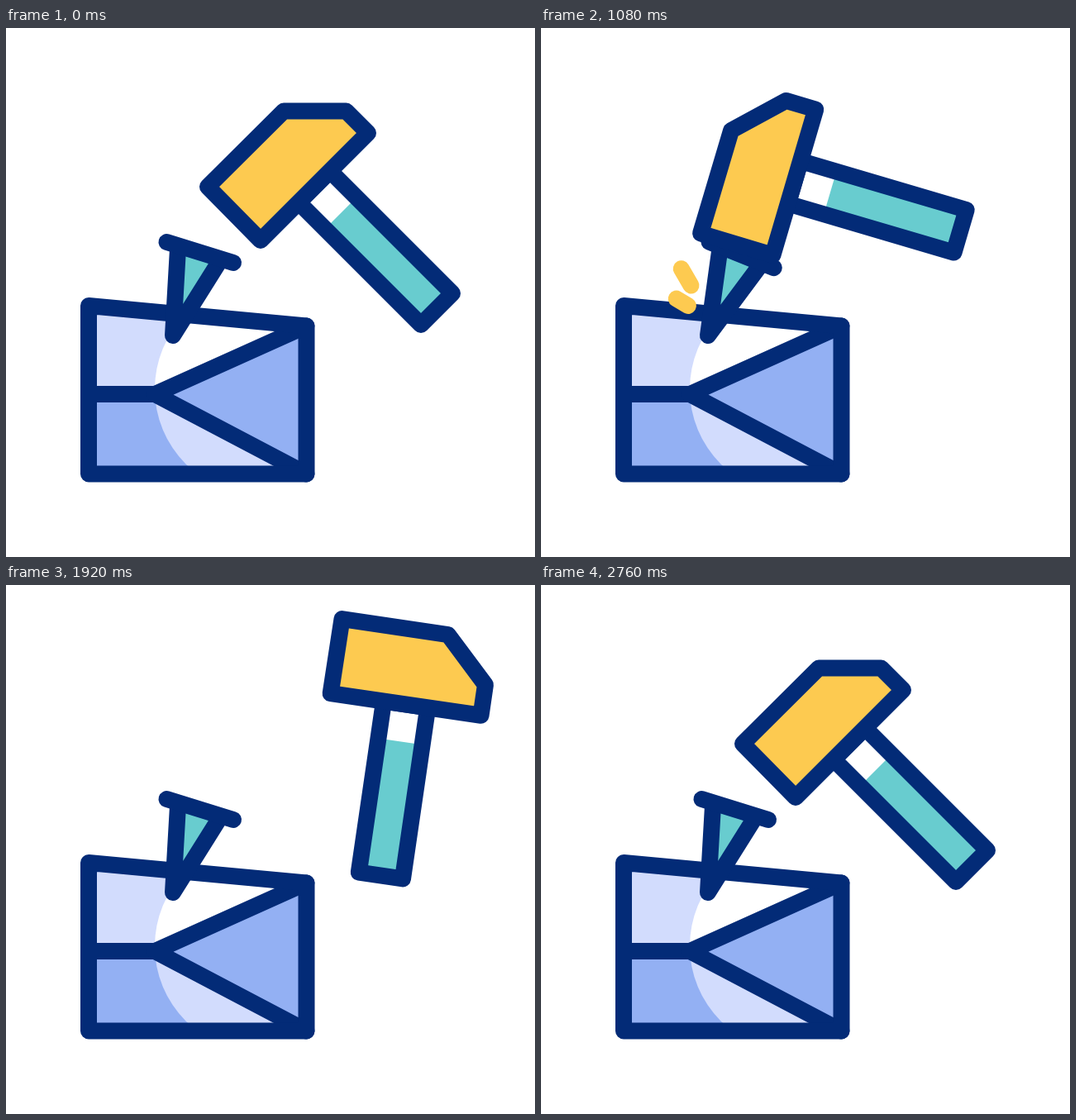
Animation of 640x640 px, one loop 3 s. Source, as an HTML page with a canvas:

```html
<!DOCTYPE html>
<html lang="en">
<head>
<meta charset="utf-8">
<title>Hammer and nail</title>
<style>
  html, body { margin: 0; width: 100%; height: 100%; overflow: hidden; background: #fff; }
  canvas { display: block; width: 640px; height: 640px; }
</style>
</head>
<body>
<canvas id="stage" width="640" height="640"></canvas>
<script>
const ctx = document.getElementById('stage').getContext('2d');
const LOOP = 3000, STEP = 40;
const NAVY = '#032b77', YELLOW = '#fdca50', TEAL = '#68cccf';
const PALE = '#d2dcfd', BLUE = '#93b0f3', WHITE = '#fff';

const clamp = u => Math.min(1, Math.max(0, u));
const mix = (a, b, u) => a + (b - a) * u;
const progress = (t, from, to) => clamp((t - from) / (to - from));
const easeIn = u => u ** 3;
const easeOut = u => 1 - (1 - u) ** 3;

// Hammer poses: pivot position and rotation in degrees.
const PIVOT = [495, 260];
const REST = { x: 495, y: 260, angle: 0 };
const RAISED = { x: 510, y: 296.5, angle: 65 };
const STRUCK = { x: 446, y: 188, angle: -28.6 };
const MOVES = [
  { start: 200, end: 600, from: REST, to: RAISED, ease: easeOut },
  { start: 600, end: 1000, from: RAISED, to: STRUCK, ease: easeIn },
  { start: 1320, end: 1720, from: STRUCK, to: RAISED, ease: easeOut },
  { start: 1720, end: 2120, from: RAISED, to: STRUCK, ease: easeIn },
  { start: 2440, end: 2760, from: STRUCK, to: REST, ease: easeOut }
];
const HITS = [1000, 2120];
const HIT_TIME = 320;

function tracePath(points, closed) {
  ctx.beginPath();
  points.forEach(([x, y]) => ctx.lineTo(x, y));
  if (closed) ctx.closePath();
}

function fillShape(points, color) {
  tracePath(points, true);
  ctx.fillStyle = color;
  ctx.fill();
}

function strokeLine(points, color = NAVY, closed = false) {
  tracePath(points, closed);
  ctx.strokeStyle = color;
  ctx.stroke();
}

function withRotation(x, y, degrees, pivot, draw) {
  ctx.save();
  ctx.translate(x, y);
  ctx.rotate(degrees * Math.PI / 180);
  ctx.translate(-pivot[0], -pivot[1]);
  draw();
  ctx.restore();
}

// A panel whose tone changes inside the round highlight.
function litPanel(points, shade, light) {
  fillShape(points, shade);
  ctx.save();
  tracePath(points, true);
  ctx.clip();
  ctx.beginPath();
  ctx.arc(308, 437, 128, 0, Math.PI * 2);
  ctx.fillStyle = light;
  ctx.fill();
  ctx.restore();
}

function drawBlock() {
  const topLeft = [100, 336], topRight = [363.5, 360.5];
  const bottomRight = [363.5, 539.5], bottomLeft = [100, 539.5];
  const left = [100, 443], fork = [180, 443];
  litPanel([topLeft, topRight, fork, left], PALE, WHITE);
  litPanel([left, fork, bottomRight, bottomLeft], BLUE, PALE);
  fillShape([fork, topRight, bottomRight], BLUE);
  strokeLine([left, fork]);
  strokeLine([topRight, fork, bottomRight]);
  strokeLine([topLeft, topRight, bottomRight, bottomLeft], NAVY, true);
}

function drawNail() {
  const spike = [[208, 267], [202, 372], [256, 286]];
  fillShape(spike, TEAL);
  strokeLine(spike);
  strokeLine([[194.5, 259], [275, 284]]);
}

function drawHammer() {
  fillShape([[354, 211], [502, 359], [540, 321], [392, 173]], WHITE);
  fillShape([[386, 243], [502, 359], [540, 321], [424, 205]], TEAL);
  strokeLine([[354, 211], [502, 359], [540, 321], [392, 173]], NAVY, true);
  const head = [[336, 100.5], [411.5, 100.5], [438, 127], [308, 257], [244, 192]];
  fillShape(head, YELLOW);
  strokeLine(head, NAVY, true);
}

function drawSpark([x0, y0], [x1, y1], from, to) {
  strokeLine([
    [mix(x0, x1, from), mix(y0, y1, from)],
    [mix(x0, x1, to), mix(y0, y1, to)]
  ], YELLOW);
}

function hammerPose(t) {
  const move = MOVES.filter(m => t >= m.start).pop();
  if (!move) return REST;
  const { from, to } = move;
  const u = move.ease(progress(t, move.start, move.end));
  return {
    x: mix(from.x, to.x, u),
    y: mix(from.y, to.y, u),
    angle: mix(from.angle, to.angle, u)
  };
}

function drawScene(t) {
  const hit = HITS.find(h => t > h - STEP && t < h + HIT_TIME);
  const since = hit === undefined ? -STEP : t - hit;
  const tilt = 6.1 * (since < 0 ? 1 + since / STEP : 1 - since / HIT_TIME);

  ctx.fillStyle = WHITE;
  ctx.fillRect(0, 0, 640, 640);
  ctx.lineWidth = 20;
  ctx.lineCap = ctx.lineJoin = 'round';

  drawBlock();
  withRotation(202, 372, tilt, [202, 372], drawNail);
  if (since > 0) {
    const tail = progress(since, 160, HIT_TIME);
    const tip = progress(since, 0, 160);
    drawSpark([181.5, 311.5], [158, 271], tail, tip);
    drawSpark([178, 336], [149.5, 319], tail, tip);
  }
  const pose = hammerPose(t);
  withRotation(pose.x, pose.y, pose.angle, PIVOT, drawHammer);
}

const started = performance.now();
function tick() {
  const time = (performance.now() - started) % LOOP;
  drawScene(Math.floor(time / STEP) * STEP);
  requestAnimationFrame(tick);
}
tick();
</script>
</body>
</html>
```
